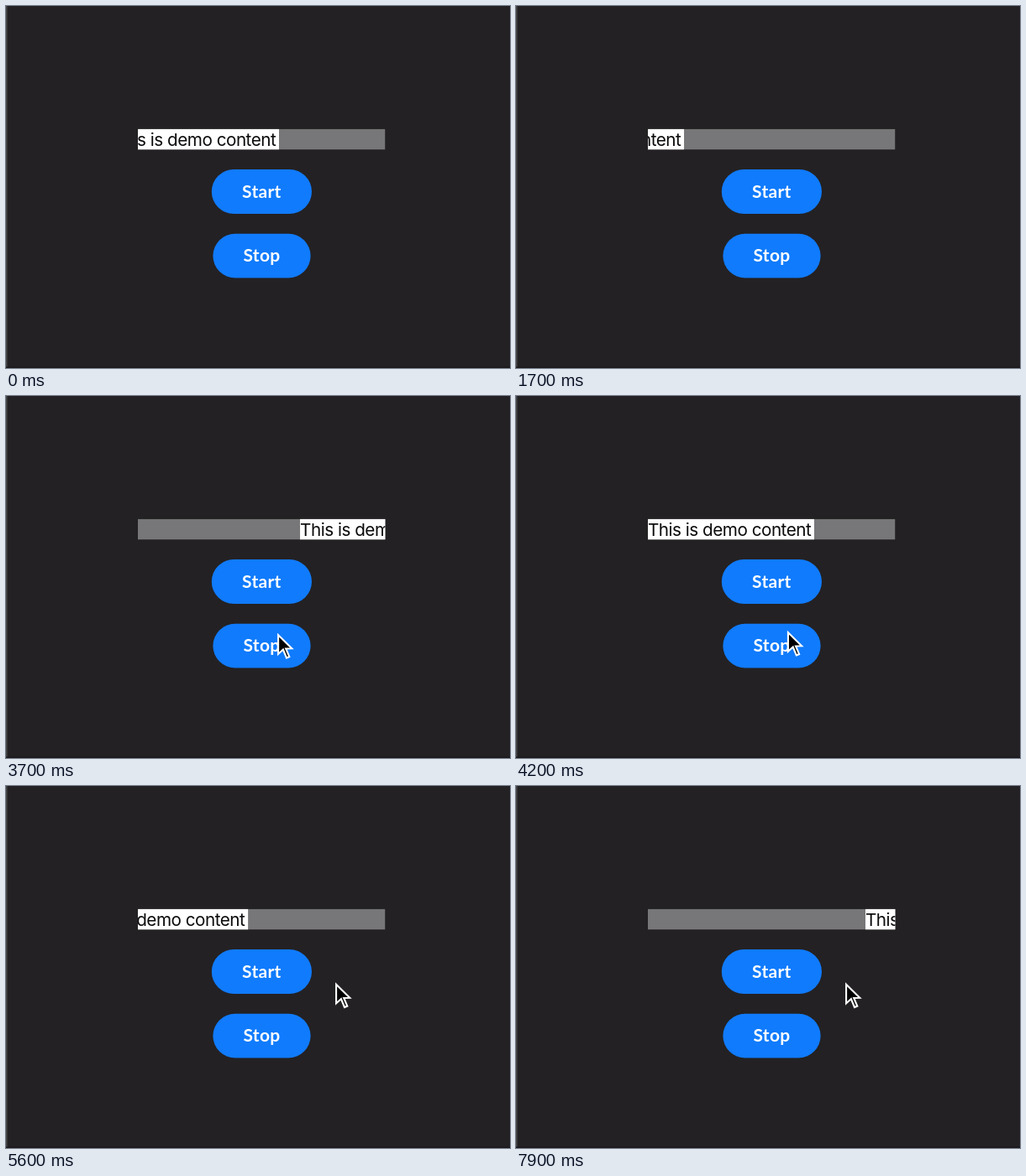
An HTML page with a canvas that plays this animation: 600 px wide and 432 px high, repeating every 8000 ms.

```html
<!DOCTYPE html>
<html lang="en">
<head>
<meta charset="utf-8">
<title>Marquee demo</title>
<style>
  html, body { margin: 0; width: 100%; height: 100%; overflow: hidden; background: #232123; }
  canvas { display: block; width: 600px; height: 432px; }
</style>
</head>
<body>
<canvas id="stage"></canvas>
<script>
const W = 600, H = 432, LOOP = 8000, STEP = 100;
const canvas = document.getElementById('stage');
const ctx = canvas.getContext('2d');
const ratio = window.devicePixelRatio || 1;
canvas.width = W * ratio;
canvas.height = H * ratio;

const BAR = { x: 157, y: 146.7, w: 294.5, h: 24.8 };
const LABEL = 'This is demo content';
const LABEL_W = 198;
const SPEED = 0.0735; // px per ms
const STOP_AT = 3900, START_AT = 4690;

const BUTTONS = [
  { text: 'Start', x: 244.8, y: 195, w: 119.2, h: 53, base: 228.7, press: 4500, release: 4700 },
  { text: 'Stop', x: 246.4, y: 271.8, w: 116.2, h: 52.8, base: 305.2, press: 3720, release: 3900 }
];

// Pointer path: time, x, y
const PATH = [
  [2300, 262, 440], [2700, 272, 262], [3000, 344, 188], [3300, 338, 222],
  [3700, 323, 282.5], [4150, 323, 282.5], [4500, 320, 228],
  [4950, 320, 228], [5500, 392, 234]
];
const ARROW = [[1.1, 2.7], [1.1, 25.4], [6.9, 20], [11, 30], [14.3, 28.6], [10.2, 19], [17.3, 18.8]];

const clamp = v => Math.max(0, Math.min(1, v));
const ease = v => v * v * (3 - 2 * v);

function labelX(t) {
  if (t >= STOP_AT && t < START_AT) return BAR.x;
  const running = t < STOP_AT;
  const start = running ? 325 - LABEL_W : BAR.x;
  const x = start - SPEED * (running ? t : t - START_AT);
  if (x + LABEL_W > BAR.x) return x;
  const entry = running ? 2320 : 7417;
  return BAR.x + BAR.w - SPEED * (t - entry);
}

function pressScale(b, t) {
  const down = ease(clamp((t - b.press) / 100));
  const up = ease(clamp((t - b.release) / 160));
  return 1 - 0.05 * down * (1 - up);
}

function drawBar(t) {
  const x = labelX(t);
  ctx.save();
  ctx.beginPath();
  ctx.rect(BAR.x, BAR.y, BAR.w, BAR.h);
  ctx.clip();
  ctx.fillStyle = '#777678';
  ctx.fillRect(BAR.x, BAR.y, BAR.w, BAR.h);
  ctx.fillStyle = '#fff';
  ctx.fillRect(x, BAR.y, LABEL_W, BAR.h);
  ctx.fillStyle = '#0b0a0c';
  ctx.font = '400 20.7px Inter, sans-serif';
  ctx.letterSpacing = '-0.5px';
  ctx.textAlign = 'left';
  ctx.fillText(LABEL, x, 166.7);
  ctx.restore();
}

function drawButton(b, t) {
  const cx = b.x + b.w / 2, cy = b.y + b.h / 2, s = pressScale(b, t);
  ctx.save();
  ctx.translate(cx, cy);
  ctx.scale(s, s);
  ctx.translate(-cx, -cy);
  ctx.fillStyle = '#107bfd';
  ctx.beginPath();
  ctx.roundRect(b.x, b.y, b.w, b.h, b.h / 2);
  ctx.fill();
  ctx.fillStyle = '#fff';
  ctx.font = '700 21px Lato, sans-serif';
  ctx.letterSpacing = '0.3px';
  ctx.textAlign = 'center';
  ctx.fillText(b.text, cx, b.base);
  ctx.restore();
}

function drawPointer(t) {
  if (t < PATH[0][0]) return;
  const i = PATH.findIndex(p => p[0] > t);
  let [, x, y] = PATH[PATH.length - 1];
  if (i > 0) {
    const [t0, x0, y0] = PATH[i - 1], [t1, x1, y1] = PATH[i];
    const k = ease((t - t0) / (t1 - t0));
    x = x0 + (x1 - x0) * k;
    y = y0 + (y1 - y0) * k;
  }
  ctx.save();
  ctx.translate(x, y);
  ctx.beginPath();
  ARROW.forEach(p => ctx.lineTo(...p));
  ctx.closePath();
  ctx.fillStyle = '#000';
  ctx.fill();
  ctx.strokeStyle = '#fff';
  ctx.lineWidth = 2.1;
  ctx.stroke();
  ctx.restore();
}

function draw(t) {
  ctx.setTransform(ratio, 0, 0, ratio, 0, 0);
  ctx.fillStyle = '#232123';
  ctx.fillRect(0, 0, W, H);
  ctx.fillStyle = '#464547';
  ctx.fillRect(0, 0, 1.6, H);
  ctx.fillStyle = '#1b191b';
  ctx.fillRect(0, H - 1.5, W, 1.5);
  drawBar(t);
  BUTTONS.forEach(b => drawButton(b, t));
  drawPointer(t);
}

const begin = performance.now();
function tick() {
  const t = (performance.now() - begin) % LOOP;
  draw(Math.floor(t / STEP) * STEP);
  requestAnimationFrame(tick);
}
tick();
</script>
</body>
</html>
```
